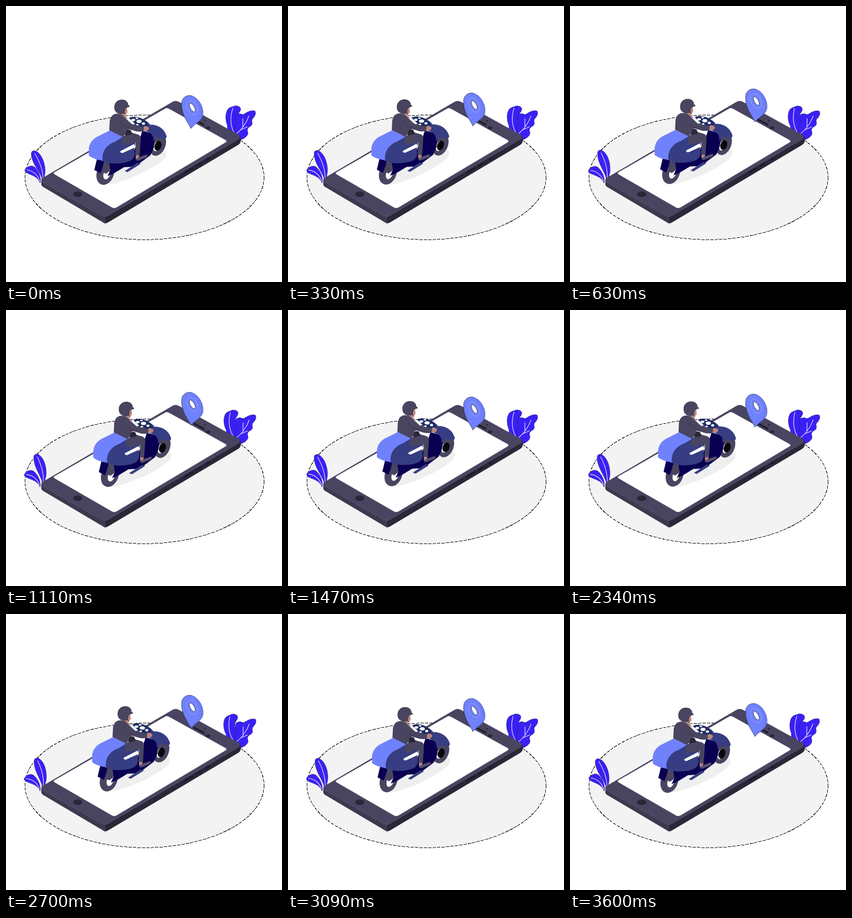
These frames come from a looping animation (500 px wide and 500 px high, 3.63 s). An HTML page:

```html
<!DOCTYPE html>
<html lang="en">
<head>
<meta charset="utf-8">
<title>Scooter delivery</title>
<style>
  html, body { margin: 0; width: 100%; height: 100%; overflow: hidden; background: #fff; }
  svg { display: block; width: 100vw; height: 100vh; }
  .grey { fill: #494560; }
  .dark { fill: #2a2738; }
  .navy { fill: #0a0052; }
  .blue { fill: #363d82; }
  .sky { fill: #7081fc; }
  .leaf { fill: #3b20f6; stroke: #1c1648; stroke-width: .5; }
  .skin { fill: #b98580; }
  .white { fill: #fff; }
  .vein { fill: none; stroke: #e6e4ff; stroke-width: 1.1; stroke-linecap: round; }
  .edge { stroke: #15131f; stroke-width: .8; stroke-dasharray: 3 1; }
</style>
</head>
<body>
<svg viewBox="0 0 500 500">
  <ellipse cx="251" cy="310.5" rx="216.5" ry="112.8" fill="#f3f3f3" stroke="#111" stroke-dasharray="6 2" shape-rendering="crispEdges"/>

  <g id="leftTall">
    <path class="leaf" d="M66 318C66 304 49 291 46 271Q44 262 52 262C64 266 71 284 71 299Q70 312 66 318Z"/>
    <path class="vein" d="M52 267C60 280 67 297 67 313"/>
  </g>
  <g id="leftLow">
    <path class="leaf" d="M62 321C58 311 52 309 46 306C39 303 34 301 34 297C38 291 46 287 52 292C59 299 64 310 62 321Z"/>
    <path class="vein" d="M38 297C48 298 57 305 61 317"/>
  </g>
  <g id="rightBack">
    <path class="leaf" d="M414 240C404 231 400 225 401 216C397 207 397 194 402 187C406 182 411 183 414 181C420 180 426 183 425 188C424 193 419 195 419 200C418 206 422 207 421 212C421 222 424 232 426 238Z"/>
    <path class="vein" d="M411 185C405 203 406 217 414 231"/>
  </g>
  <g id="rightFront">
    <path class="leaf" d="M424 243L417 231C412 224 414 216 417 211C415 203 414 197 419 196C425 193 427 198 431 196C437 192 444 188 451 190C454 195 450 201 447 204C443 208 449 212 444 217C439 220 436 222 438 228C440 234 433 240 424 243Z"/>
    <path class="vein" d="M418 231C427 224 436 211 440 199M429 220L429 204M426 224L437 219"/>
  </g>

  <path class="dark" d="M64 315V322Q64 326 68 328L176 392Q180 395 185 392L420 252Q425 249 425 245V236L180 373Z"/>
  <path fill="#3d394f" d="M64 314V322Q64 326 68 328L176 392Q178 394 180 394V374Z"/>
  <path class="grey" d="M67 311L301 174Q307 170 314 174L421 233Q427 237 421 241L186 379Q180 383 174 380L67 320Q61 315 67 311Z"/>
  <path fill="none" stroke="#625d78" stroke-width=".7" d="M65 318L174 380Q180 383 186 379L423 240"/>
  <path class="white" d="M88 301L288 186Q291 184 295 186L398 243Q401 245 398 247L200 365Q196 367 192 365L88 305Q85 303 88 301Z"/>
  <ellipse class="dark" cx="130" cy="341" rx="8.5" ry="5"/>
  <path stroke="#211e2c" stroke-width="3.6" stroke-linecap="round" d="M341 206L358 215"/>
  <ellipse class="dark" cx="366" cy="220.5" rx="4.5" ry="2.6"/>
  <circle class="dark" cx="360.5" cy="208" r="1.6"/>
  <path stroke="#15131e" stroke-width="2" stroke-linecap="round" d="M324 302L338 294M345 290L353 285M364 279L369 276"/>

  <g id="pin">
    <path class="sky edge" d="M335 222C330 211 318 198 318 178C318 167 325 162 333 162C347 164 357 180 357 194C357 208 344 211 335 222Z"/>
    <path fill="#6a7bf6" d="M335 222C340 211 352 207 353 195C353 181 345 168 335 162C347 164 357 180 357 194C357 208 344 211 335 222Z"/>
    <ellipse cx="337" cy="184" rx="9" ry="14" transform="rotate(-27 337 184)" fill="none" stroke="#98a4ff" stroke-width=".8"/>
    <ellipse class="white edge" cx="337.5" cy="184" rx="3.6" ry="8.6" transform="rotate(-30 337.5 184)"/>
  </g>

  <g id="scooter">
    <path fill="#efefef" d="M183 324C210 321 268 296 288 275C296 263 289 256 270 265L188 306Z"/>

    <g transform="rotate(20 275 251)">
      <ellipse class="grey" cx="275" cy="251" rx="14" ry="21"/>
      <ellipse class="white" cx="274" cy="255" rx="5.5" ry="9"/>
      <ellipse cx="276" cy="253" rx="6" ry="9" fill="#08070d"/>
    </g>
    <g transform="rotate(20 180 303)">
      <ellipse class="grey" cx="180" cy="303" rx="15.5" ry="21.5"/>
      <ellipse class="white" cx="183" cy="303" rx="6" ry="10.5"/>
    </g>
    <path class="navy" d="M165 276L179 282L171 303L160 297Z"/>
    <path class="grey" d="M177 284L193 285L188 299L181 304L174 300Z"/>
    <path class="navy" d="M187 284L228 270L243 238L247 226L266 231Q271 240 268 256L262 270L234 291L214 292L194 304L184 308L189 297Z"/>
    <path class="blue" d="M215 299L238 284L244 286L220 301Z"/>

    <path class="blue" d="M223 203C235 197 255 206 261 215C276 214 288 224 291 236C291 242 285 240 280 239C271 235 267 244 266 250Q270 234 259 229L246 224Z"/>
    <path fill="#1d2b62" d="M223 203C234 197 250 204 257 213L256 222L245 224Z"/>
    <g class="white">
      <ellipse cx="230.5" cy="206.5" rx="3.4" ry="2.2"/>
      <ellipse cx="241" cy="209" rx="4.7" ry="3"/>
      <ellipse cx="237" cy="203.5" rx="2.6" ry="1.4"/>
      <ellipse cx="249" cy="213" rx="2.8" ry="2.2"/>
      <ellipse cx="238" cy="215" rx="2.4" ry="1.5"/>
    </g>

    <path class="sky" d="M150 271V259C151 247 159 239 169 235L197 221L215 236L197 247C183 252 176 263 175 280Q159 278 150 271Z"/>
    <path class="blue" d="M175 280C173 263 183 251 197 246L214 236L236 240L232 261Q236 275 224 281C209 287 183 287 175 280Z"/>
    <path class="white" d="M207 263L232 250L234 256L212 266Q207 267 207 263Z"/>

    <path class="skin" d="M235 266L242 268L240 280L235 276Z"/>
    <path fill="#575169" d="M235 278L239 275L243 273L255 269Q258 272 253 275L240 280Q236 281 235 278Z"/>
    <path class="grey" d="M211 237L226 229L240 233Q245 236 244 243L242 271L234 270L235 247L212 253Q208 245 211 237Z"/>
    <path class="dark" d="M216 228Q219 222 226 225L229 232L216 235Z"/>
    <path class="skin" d="M248 219Q255 215 259 221Q259 226 252 227L247 225Z"/>
    <path class="skin" d="M207 190L219 183L220 193L215 198L221 205L207 200Z"/>
    <path class="grey" d="M188 207Q191 195 201 195Q210 195 215 202L228 214L250 219L249 227Q239 229 229 225L219 222L216 233L211 237L187 225Z"/>
    <path fill="none" stroke="#332f45" stroke-width=".7" d="M207 207Q210 218 226 222"/>
    <path class="grey edge" d="M198 190C194 180 199 170 210 170C217 170 221 174 221 179L224 182L216 185L214 194Q204 198 198 190Z"/>
    <path fill="none" stroke="#211e2c" d="M214 193L217 198"/>
  </g>
</svg>
<script>
  const LOOP = 3630, STEP = 30, RIDE = 3600, BOB = 1800;
  const part = id => document.getElementById(id);
  const wave = (t, period) => (1 - Math.cos(2 * Math.PI * t / period)) / 2;
  const move = (id, x, y) => part(id).setAttribute('transform', `translate(${x} ${y})`);
  const turn = (id, angle, x, y) => part(id).setAttribute('transform', `rotate(${angle} ${x} ${y})`);

  function draw(now) {
    const t = Math.floor(now % LOOP / STEP) * STEP;
    const ride = wave(t, RIDE), bob = wave(t, BOB);
    move('scooter', 12 * ride, -5 * ride);
    move('pin', 0, -15 * bob);
    turn('leftTall', 6 * bob, 66, 318);
    turn('leftLow', -3 * bob, 62, 321);
    turn('rightBack', -6 * bob, 418, 238);
    turn('rightFront', 1 * bob, 424, 242);
    requestAnimationFrame(() => draw(performance.now()));
  }
  draw(0);
</script>
</body>
</html>
```
